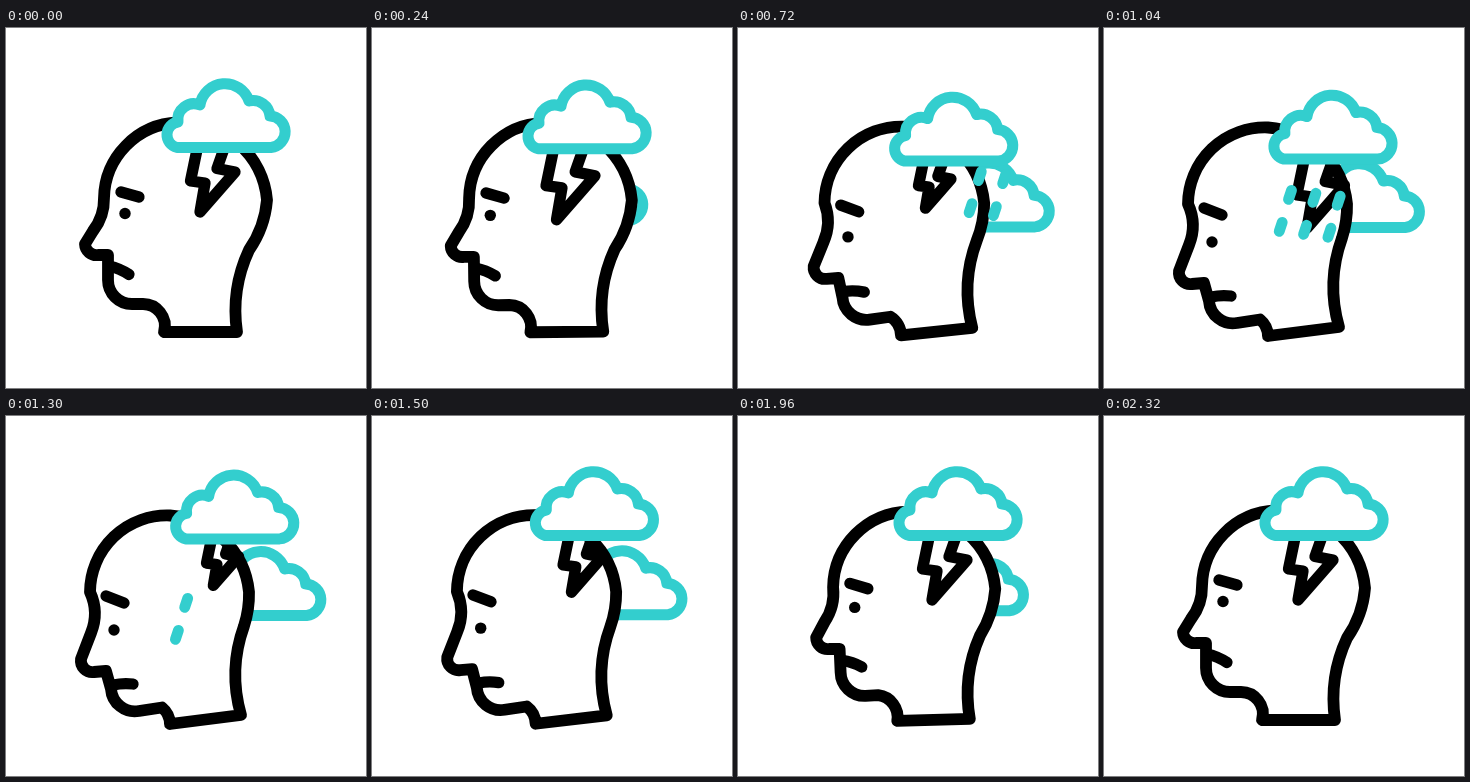
Animation of 360 by 360 pixels, one loop 2.4 s. Source, as an HTML page with a canvas:

```html
<!DOCTYPE html>
<html lang="en">
<head>
<meta charset="utf-8">
<title>Gloomy head</title>
<style>
html, body { margin: 0; width: 100%; height: 100%; overflow: hidden; background: #fff; }
canvas { display: block; width: 360px; height: 360px; }
</style>
</head>
<body>
<canvas id="stage"></canvas>
<script>
const LOOP = 2400, LAST = 2320;
const TEAL = '#33cece', BLACK = '#000', WHITE = '#fff';
const canvas = document.getElementById('stage');
const ctx = canvas.getContext('2d');
const ratio = window.devicePixelRatio || 1;
canvas.width = canvas.height = 360 * ratio;

// Arc nodes are [x, y, radius of the arc leading here]; a negative radius turns left, 0 is a line
const cloudNodes = [[171, 119.5, 0], [172, 94, 13], [194, 77, 16], [243, 73, 25.3], [264, 88, 17], [265, 119.5, 15.8]];

// Head nodes are [upright x, y, bowed x, y, radius]
const headNodes = [
  [158, 304, 164, 308, 0], [231, 304, 235, 299, 0],                            // neck
  [243, 222, 238, 210, 145], [261, 172, 243, 176, -102],                       // nape
  [172, 94.5, 164, 99.5, -85], [98, 170, 84, 176, -77],                        // skull
  [87, 203, 85, 217, 52], [79, 216, 75, 243, 0], [92, 227, 88, 256, -11.5],    // nose
  [102, 227, 100, 255, 0], [102, 252, 105, 273, 0],                            // lip
  [126, 276, 133, 295, -24], [136, 276, 156, 291.5, 0], [158, 304, 164, 308, 22] // chin
];
const boltNodes = [[193, 112], [184.5, 153], [199, 155], [194, 184], [229, 144], [211, 140.5], [221, 112]];

const lerp = (a, b, p) => a + (b - a) * p;
const clamp = u => Math.min(1, Math.max(0, u));
const ease = (t, from, to) => (1 - Math.cos(Math.PI * clamp((t - from) / (to - from)))) / 2;

function nodePath(nodes) {
  const arcs = nodes.slice(1).map(([x, y, r = 0]) =>
    `A${Math.abs(r)} ${Math.abs(r)} 0 0 ${r > 0 ? 1 : 0} ${x} ${y}`);
  return new Path2D(`M${nodes[0][0]} ${nodes[0][1]}` + arcs.join(''));
}

function stroke(path, color, width) {
  ctx.strokeStyle = color;
  ctx.lineWidth = width;
  ctx.stroke(path);
}

function drawShape(path, color, width) {
  path.closePath();
  ctx.fillStyle = WHITE;
  ctx.fill(path);
  stroke(path, color, width);
}

function drawCloud(dx, dy) {
  ctx.save();
  ctx.translate(dx, dy);
  drawShape(nodePath(cloudNodes), TEAL, 11);
  ctx.restore();
}

function drawHead(p) {
  const pose = nodes => nodes.map(([x, y, bx, by, r]) => [lerp(x, bx, p), lerp(y, by, p), r]);
  drawShape(nodePath(pose(headNodes)), BLACK, 11.8);
  stroke(nodePath(pose([[115, 164, 100, 180], [133, 169, 118, 187]])), BLACK, 11.3);
  stroke(nodePath(pose([[103, 238, 107, 269, 0], [123, 246.5, 127, 268, 60]])), BLACK, 11.3);
  const [[x, y]] = pose([[119, 185.5, 108, 214]]);
  ctx.beginPath();
  ctx.arc(x, y, 5.7, 0, Math.PI * 2);
  ctx.fillStyle = BLACK;
  ctx.fill();
}

// The bolt grows out of the underside of the cloud
function drawBolt(t, dy) {
  const dx = -10 * ease(t, 0, 330) + 20 * ease(t, 700, 1060) - 10 * ease(t, 1320, 1640);
  const scale = 1 + .1 * ease(t, 0, 240) - .37 * ease(t, 240, 700) + .35 * ease(t, 720, 1010)
    - .36 * ease(t, 1010, 1310) + .28 * ease(t, 1310, 1660);
  const nodes = boltNodes.map(([x, y]) => [lerp(206, x, scale) + dx, lerp(119.5, y, scale) + dy]);
  stroke(nodePath(nodes), BLACK, 11.3);
}

// Slanted columns of two drops each, starting one after another from right to left
function drawRain(t) {
  for (let i = 0; i < 4; i++) {
    const from = 520 + 110 * i, to = 1000 + 130 * i;
    const size = clamp(Math.min(t - from, to - t) / 80);
    if (!size) continue;
    for (const gap of [0, 32]) {
      const y = 135.6 + 5.5 * i + gap + .077 * (t - from);
      const x = 310 - 25.2 * i - .29 * y;
      const hx = 1.5 * size, hy = 4.5 * size;
      stroke(nodePath([[x + hx, y - hy], [x - hx, y + hy]]), TEAL, 10.8 * size);
    }
  }
}

function draw(t) {
  ctx.setTransform(ratio, 0, 0, ratio, 0, 0);
  ctx.fillStyle = WHITE;
  ctx.fillRect(0, 0, 360, 360);
  ctx.lineCap = ctx.lineJoin = 'round';

  const backX = -24 + 56 * ease(t, 0, 680) + 4.5 * ease(t, 680, 1100)
    - 60.5 * clamp((t - 1200) / (LAST - 1200)) ** 1.8;
  const frontX = -6 * ease(t, 0, 330) + 15.5 * ease(t, 620, 1100) - 9.5 * ease(t, 1220, 1640);
  const frontY = 14.5 * (ease(t, 100, 840) - ease(t, 840, 1520));

  drawCloud(backX, 80 - (36 - backX) * .16);
  drawHead(ease(t, 100, 960) - ease(t, 1360, 2220));
  drawBolt(t, frontY);
  drawRain(t);
  drawCloud(frontX, frontY);
}

const start = performance.now();
function tick() {
  draw(Math.min((performance.now() - start) % LOOP, LAST));
  requestAnimationFrame(tick);
}
tick();
</script>
</body>
</html>
```
